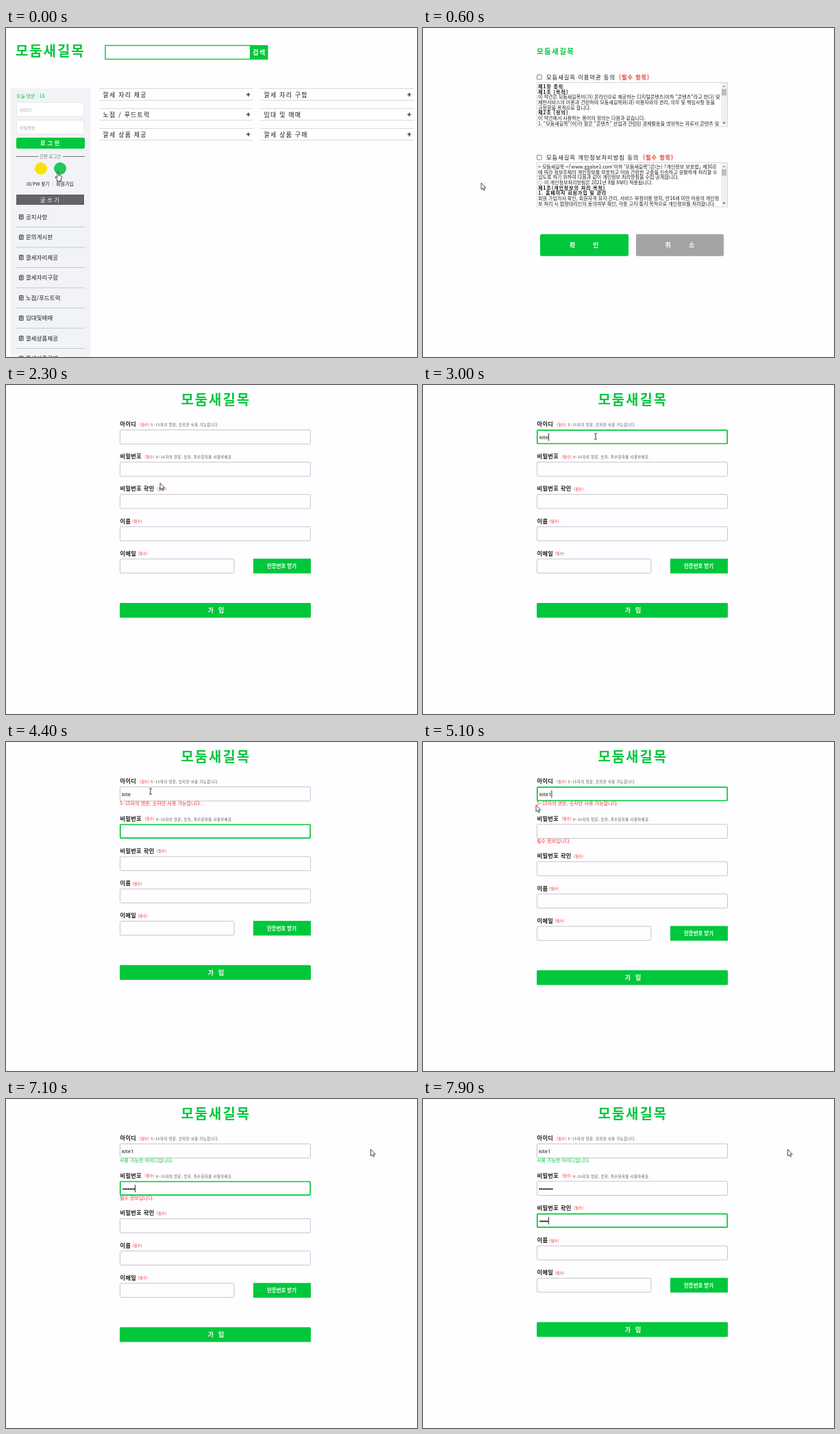
Recreate the animation shown at these times as an HTML page. Size 600 by 480 pixels, loop 8000 ms.

```html
<!DOCTYPE html>
<html lang="ko">
<head>
<meta charset="utf-8">
<title>회원가입</title>
<style>
html, body { margin: 0; width: 100%; height: 100%; overflow: hidden; background: #fefdff; }
svg { display: block; font-family: "Noto Sans CJK KR", "Noto Sans CJK", "Noto Sans", sans-serif; }
text { white-space: pre; }
</style>
</head>
<body>
<svg id="stage" width="600" height="480" viewBox="0 0 600 480"></svg>
<script>
const LOOP = 8000, STEP = 100;
const GREEN = "#00c73c", RED = "#ea3a2e", INK = "#1c1c1c";
const SITE = "모둠새길목", USER = "kite";
const stage = document.getElementById("stage");
const ruler = document.createElement("canvas").getContext("2d");
const VALUE_FONT = '"Noto Sans", sans-serif';
ruler.font = "76px " + VALUE_FONT;
const valueWidth = s => ruler.measureText(s).width / 10;

const text = (x, y, size, s, { fill = INK, weight = 400, gap = 0, font = "" } = {}) =>
  `<text x="${x}" y="${y}" font-size="${size}" fill="${fill}" font-weight="${weight}" letter-spacing="${gap}"` +
  `${font && ` font-family='${font}'`}>${s}</text>`;
const box = (x, y, w, h, fill, r = 0, stroke = "none", line = 1) =>
  `<rect x="${x}" y="${y}" width="${w}" height="${h}" rx="${r}" fill="${fill}" stroke="${stroke}" stroke-width="${line}"/>`;
const path = (d, stroke, width = 1, fill = "none") =>
  `<path d="${d}" stroke="${stroke}" stroke-width="${width}" fill="${fill}"/>`;
const disc = (x, y, r, fill) => `<circle cx="${x}" cy="${y}" r="${r}" fill="${fill}"/>`;
const white = (weight, gap = 0) => ({ fill: "#fff", weight, gap });
const siteTitle = (x, y) => text(x, y, 20, SITE, { fill: GREEN, weight: 700, gap: 1.9 });

// Home page
function menuItem(label, i) {
  const y = 275.5 + 29.5 * i;
  return box(19.5, y - 3, 5.6, 6.4, "none", .3, "#222", .9) +
    path(`M20.6 ${y - 1.3}h3.4M20.6 ${y + .2}h3.4M20.6 ${y + 1.7}h2.4`, "#222", .8) +
    text(29, y + 3, 8.4, label, { gap: .15 }) +
    path(`M15 ${y + 15}h100`, "#c3c8cc");
}

function board(label, i) {
  const x = i % 2 ? 371 : 136, y = 88.5 + 29 * (i >> 1);
  return path(`M${x} ${y}h224.5M${x} ${y + 17}h224.5`, "#d9d9dc") +
    text(x + 5.5, y + 12, 9, label, { weight: 500, gap: 1.2 }) +
    path(`M${x + 215} ${y + 8.7}h5.4M${x + 217.7} ${y + 6}v5.4`, "#333", 1.3);
}

function homePage() {
  return siteTitle(14, 40.5) +
    box(145, 25.5, 212, 20, "#fff", 0, GREEN, 1.4) + box(356, 25, 26.5, 21.2, GREEN) +
    text(360, 39, 9.4, "검색", white(700, 1)) +
    box(7, 88, 116, 392, "#f1f3f6") +
    text(15, 101.8, 7, "오늘 방문 : 18", { fill: GREEN, weight: 500 }) +
    box(15.5, 108.5, 98.5, 20.5, "#fff", 2, "#e4e6e9") + text(20, 121.5, 6.2, "아이디", { fill: "#a5a5a8" }) +
    box(15.5, 134.5, 98.5, 20.5, "#fff", 2, "#e4e6e9") + text(20, 147.7, 6.2, "비밀번호", { fill: "#a5a5a8" }) +
    box(15, 160, 100, 16, GREEN, 2) + text(50, 171.2, 8.2, "로그인", white(700, 2.8)) +
    path("M15 187.5h32M83 187.5h32", "#77777a") + text(49, 189.5, 6.4, "간편 로그인", { fill: "#77777a" }) +
    disc(51, 205, 9, "#fae100") + disc(79, 205, 9, "#1fc75c") +
    text(30, 229.7, 6.7, "ID/PW 찾기") + path("M68.5 224v6", "#ccc", .8) + text(73, 229.7, 7, "회원가입") +
    box(15, 243, 99, 15, "#666366") + text(50, 253.8, 8, "글쓰기", white(400, 2.8)) +
    ["공지사항", "문의게시판", "깔세자리제공", "깔세자리구함", "노점/푸드트럭", "임대및매매", "깔세상품제공", "깔세상품구매"]
      .map(menuItem).join("") +
    ["깔세 자리 제공", "깔세 자리 구함", "노점 / 푸드트럭", "임대 및 매매", "깔세 상품 제공", "깔세 상품 구매"]
      .map(board).join("");
}

// Terms page; lines starting with * are bold
const TERMS = `*제1장 총칙
*제1조 [목적]
이 약관은 ${SITE}이(가) 온라인으로 제공하는 디지털콘텐츠(이하 "콘텐츠"라고 한다) 및
제반서비스의 이용과 관련하여 ${SITE}와(과) 이용자와의 권리, 의무 및 책임사항 등을
규정함을 목적으로 합니다.
*제2조 [정의]
이 약관에서 사용하는 용어의 정의는 다음과 같습니다.
1. "${SITE}"(이)라 함은 "콘텐츠" 산업과 관련된 경제활동을 영위하는 자로서 콘텐츠 및`;
const PRIVACY = `&lt; ${SITE} >('www.ggalse1.com'이하 '${SITE}')은(는) ｢개인정보 보호법｣ 제30조
에 따라 정보주체의 개인정보를 보호하고 이와 관련한 고충을 신속하고 원활하게 처리할 수
있도록 하기 위하여 다음과 같이 개인정보 처리방침을 수립·공개합니다.
◇ 이 개인정보처리방침은 2021년 8월 8부터 적용됩니다.
*제1조(개인정보의 처리 목적)
*1. 홈페이지 회원가입 및 관리
회원 가입의사 확인, 회원자격 유지·관리, 서비스 부정이용 방지, 만14세 미만 아동의 개인정
보 처리 시 법정대리인의 동의여부 확인, 각종 고지·통지 목적으로 개인정보를 처리합니다.`;

function agreement(y, label, redX, lines, checked) {
  const check = checked
    ? box(166, y, 7.6, 7.6, "#0075ff", 1) + path(`M167.6 ${y + 3.9}l1.7 1.8l2.9 -3.8`, "#fff", 1.2)
    : box(166.5, y + .5, 6.6, 6.6, "#fff", .5, "#767676", .9);
  return check +
    text(180, y + 7.2, 8.3, `${SITE} ${label} 동의`, { gap: .95 }) +
    text(redX, y + 7.2, 8.3, "(필수 항목)", { fill: RED, weight: 700, gap: .85 }) +
    box(166.5, y + 11.5, 278, 64.5, "#fff", 0, "#d6d6da") +
    box(435, y + 12, 9, 63.5, "#f1f1f1") + box(436, y + 21, 7, 9.5, "#bdbdbf") +
    path(`M437.4 ${y + 18}h4.2l-2.1 -2.4z`, "none", 0, "#999") +
    path(`M437.4 ${y + 69.5}h4.2l-2.1 2.4z`, "none", 0, "#555") +
    lines.split("\n").map((line, i) => {
      const bold = line[0] === "*";
      return text(168, y + 20.2 + 7.63 * i, 7.05, line.slice(bold), bold ? { weight: 700, gap: .85 } : {});
    }).join("");
}

function termsPage({ checks }) {
  return text(166, 37.6, 10.6, SITE, { fill: GREEN, weight: 700, gap: 1.3 }) +
    agreement(68, "이용약관", 286, TERMS, checks > 0) +
    agreement(185, "개인정보처리방침", 321, PRIVACY, checks > 1) +
    box(171, 300.7, 129, 32, GREEN, 2) + box(311, 300.7, 128, 32, "#a6a3a6", 2) +
    [[214, "확"], [248, "인"], [353.5, "취"], [388, "소"]].map(([x, s]) => text(x, 320, 9, s, white(700))).join("");
}

// Sign-up page
const FIELDS = [
  ["아이디", 195, "5~15자의 영문, 숫자만 사용 가능합니다."],
  ["비밀번호", 202.5, "8~16자의 영문, 숫자, 특수문자를 사용하세요."],
  ["비밀번호 확인", 220, ""],
  ["이름", 184.5, ""],
  ["이메일", 192.5, ""]
];
const NOTES = {
  rule: ["5~15자의 영문, 숫자만 사용 가능합니다.", RED],
  ok: ["사용 가능한 아이디입니다.", GREEN],
  required: ["필수 정보입니다.", RED]
};

function signupPage({ id, dots, focus, caret, notes }) {
  let out = siteTitle(255.5, 29.3), y = 65;
  FIELDS.forEach(([label, redX, hint], i) => {
    const focused = focus === i, x = focused ? 170 : 169;
    out += text(166.5, y - 4.8, 8.2, label, { weight: 700, gap: .4 }) +
      text(redX, y - 5.3, 5.6, "(필수)", { fill: RED }) +
      text(redX + 16.5, y - 5, 5.4, hint, { fill: "#555", gap: .38 });
    const w = i === 4 ? 166.5 : 278;
    out += focused
      ? box(166.8, y + .9, w - .6, 19.6, "#fff", 1, GREEN, 1.7)
      : box(166.5, y + .5, w, 20.5, "#fefdff", 1.5, "#c6c5ca");
    let end = x;
    if (i === 0) {
      out += text(x, y + 13.8, 7.6, id, { font: VALUE_FONT, fill: "#111" });
      end += valueWidth(id);
    } else if (dots[i]) {
      for (let k = 0; k < dots[i]; k++) out += disc(x + 1.4 + 2.58 * k, y + 11.8, 1.15, "#111");
      end += 2.58 * dots[i];
    }
    if (focused && caret) out += path(`M${end + .5} ${y + 5.5}v11`, "#111", .9);
    const note = NOTES[notes[i]];
    if (note) out += text(166, y + 27, 7.1, note[0], { fill: note[1] });
    y += 47.1 + (note ? 7.5 : 0);
  });
  y -= 47.1;
  return out + box(361, y, 84, 21.5, GREEN) + text(381, y + 13.8, 7.45, "인증번호 받기", white(700)) +
    box(166, y + 64.5, 279, 21.5, GREEN, 1.5) +
    text(294.8, y + 78.6, 9, "가", white(700)) + text(310, y + 78.6, 9, "입", white(700));
}

const CURSORS = {
  arrow: path("M0 0V9.6L2.2 7.6L3.7 11L5.2 10.3L3.8 7.1H6.7Z", "#222", .8, "#fff"),
  beam: path("M-2 -4.3Q0 -4.3 0 -3.3Q0 -4.3 2 -4.3M0 -3.3V3.3M-2 4.3Q0 4.3 0 3.3Q0 4.3 2 4.3", "#222", .9),
  hand: path("M-1 .8Q0 -.7 1 .8V5L2.6 5.2L4.4 5.8Q5.4 6.2 5.2 8L4.4 11V13.5H-1.4V11.5L-4 7.8Q-4 6.3 -2.6 7L-1 8.4Z", "#222", .9, "#fff")
};
const cursorAt = ([kind, x, y]) => `<g transform="translate(${x} ${y})">${CURSORS[kind]}</g>`;

// Each entry changes part of the state from its time on
const move = (kind, x, y, rest) => ({ cursor: [kind, x, y], ...rest });
const TIMELINE = [
  [0, move("hand", 76, 210, { page: homePage, checks: 0, id: "", dots: [], notes: [], focus: -1, caret: false })],
  [100, move("hand", 83, 218)],
  [200, move("hand", 91, 227)],
  [400, move("hand", 85, 226)],
  [600, move("arrow", 85, 226, { page: termsPage })],
  [700, move("arrow", 105, 190)],
  [800, move("arrow", 142, 120)],
  [900, move("arrow", 168, 76)],
  [1000, move("arrow", 170, 72, { checks: 1 })],
  [1100, move("arrow", 170, 90)],
  [1200, move("arrow", 171, 140)],
  [1300, move("arrow", 171, 182)],
  [1400, move("arrow", 171, 190)],
  [1500, { checks: 2 }],
  [1600, move("arrow", 205, 225)],
  [1700, move("arrow", 260, 285)],
  [1800, move("hand", 293, 306)],
  [2000, move("arrow", 291, 300, { page: signupPage })],
  [2100, move("arrow", 278, 250)],
  [2200, move("arrow", 248, 190)],
  [2300, move("arrow", 225, 143)],
  [2400, move("arrow", 222, 100)],
  [2500, move("beam", 228, 76)],
  [2600, { focus: 0, caret: true }],
  [2700, move("beam", 250, 125)],
  [2800, move("arrow", 262, 200)],
  [2900, move("beam", 252, 75, { id: USER.slice(0, 2) })],
  [3000, { id: USER }],
  [3300, move("beam", 244, 82, { caret: false })],
  [3400, move("arrow", 226, 100)],
  [3500, move("beam", 215, 118)],
  [3700, { focus: 1, caret: true, notes: ["rule"] }],
  [3800, move("arrow", 214, 108)],
  [3900, move("arrow", 213, 100)],
  [4200, move("arrow", 212, 88, { caret: false })],
  [4300, move("beam", 211, 76)],
  [4400, move("beam", 211, 72)],
  [4500, { focus: 0, caret: true, notes: ["rule", "required"] }],
  [4800, { caret: false }],
  [5000, { id: USER + 1, caret: true }],
  [5100, move("arrow", 165, 92)],
  [5200, move("arrow", 127, 112)],
  [5300, move("beam", 230, 130, { focus: 1, notes: ["ok", "required"] })],
  [5400, move("beam", 400, 138, { caret: false })],
  [5700, move("beam", 439, 110, { caret: true })],
  [5800, move("arrow", 500, 88)],
  [5900, move("arrow", 532.5, 73.5)],
  [6200, { caret: false }],
  [6400, { caret: true }],
  ...[1, 2, 3, 4, 5].map(n => [6400 + 100 * n, { dots: [0, n] }]),
  [7100, { dots: [0, 7] }],
  [7200, { dots: [0, 8] }],
  [7300, { focus: 2, notes: ["ok"] }],
  [7700, { dots: [0, 8, 2] }],
  [7800, { dots: [0, 8, 4] }],
  [7900, { dots: [0, 8, 5] }]
];

let shown = -1;
function frame(now) {
  const time = Math.floor(now % LOOP / STEP) * STEP;
  if (time !== shown) {
    shown = time;
    const state = Object.assign({}, ...TIMELINE.filter(([start]) => start <= time).map(([, change]) => change));
    stage.innerHTML = state.page(state) + cursorAt(state.cursor);
  }
  requestAnimationFrame(frame);
}
frame(performance.now());
</script>
</body>
</html>
```
